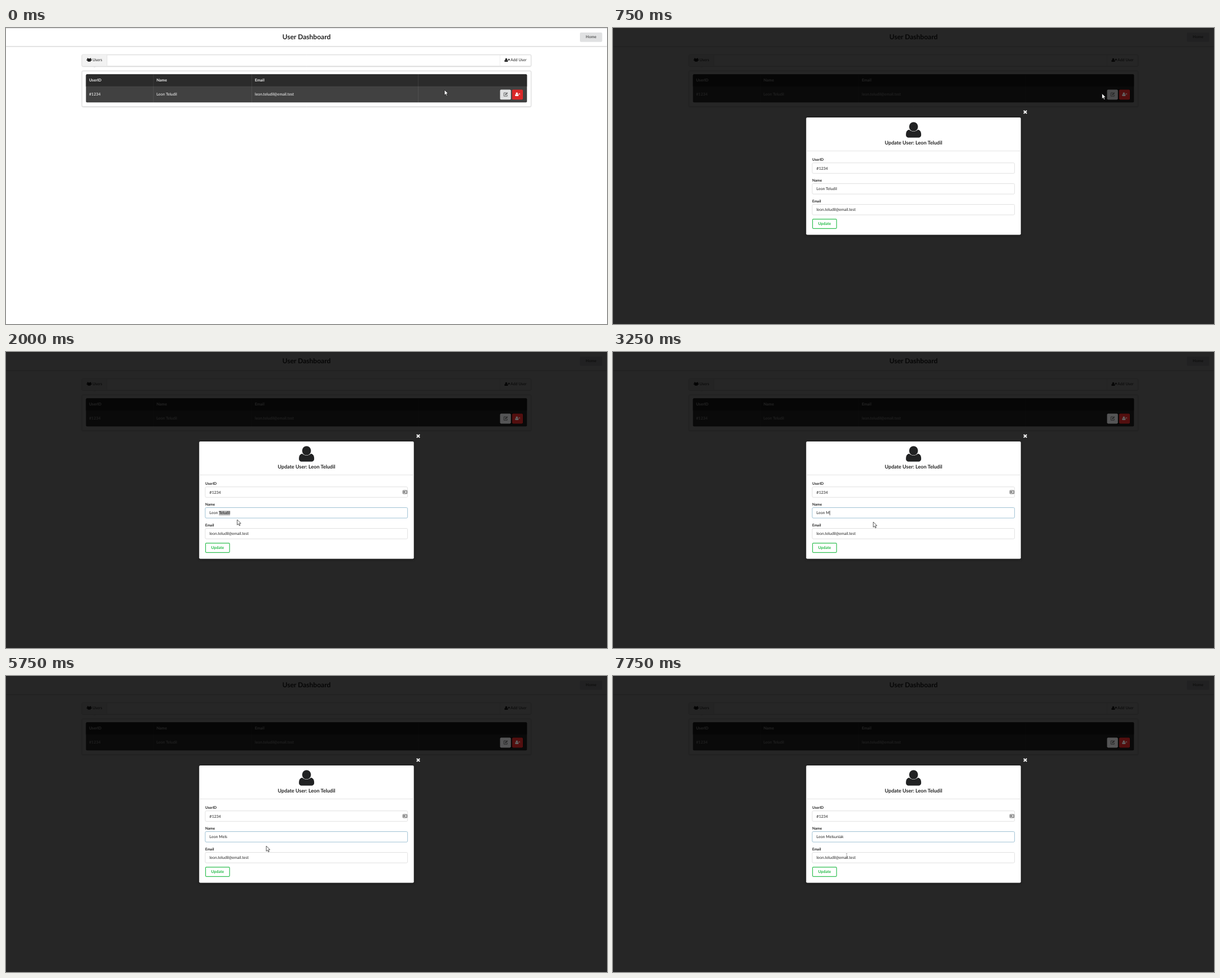
Write an HTML page with a canvas that moves like this. It is 1065x526 px and loops after 8 s.

```html
<!DOCTYPE html>
<html lang="en">
<head>
<meta charset="utf-8">
<title>User Dashboard</title>
<style>
html, body { margin: 0; width: 100%; height: 100%; overflow: hidden; background: #fff; }
canvas { display: block; width: 1065px; height: 526px; }
</style>
</head>
<body>
<canvas id="stage"></canvas>
<script>
const W = 1065, H = 526, LOOP = 8000, STEP = 250;
const canvas = document.getElementById('stage');
const ctx = canvas.getContext('2d');
const dpr = window.devicePixelRatio || 1;
canvas.width = W * dpr;
canvas.height = H * dpr;

const INK = 'rgba(0,0,0,.87)';
const LINE = '#dedede';
const USER = { id: '#1234', first: 'Leon ', last: 'Teludil', email: 'leon.teludil@email.test' };
const NEW_LAST = 'Melsuniak';
const fullName = USER.first + USER.last;

// [start time, pointer kind, x, y]
const POINTER = [
  [0, 'arrow', 777, 110], [250, 'arrow', 863, 110.5], [500, 'hand', 882, 116],
  [750, 'arrow', 866.5, 116.5], [1000, 'arrow', 463, 196], [1250, 'arrow', 369.5, 263],
  [1500, 'beam', 394, 280], [2000, 'arrow', 409.7, 298], [2250, 'arrow', 460.5, 302],
  [2500, 'arrow', 461.2, 302], [7750, 'beam', 414, 315]
];
// [start time, letters typed]
const TYPING = [[3250, 1], [3500, 2], [3750, 3], [4000, 4], [6000, 5], [6250, 6], [6500, 7], [6750, 9]];
// [start time, caret shown]
const CARET = [[0, 0], [3250, 1], [4500, 0], [5000, 1], [5750, 0], [6000, 1], [7500, 0]];

const latest = (list, t) => list.filter(e => e[0] <= t).pop();

function setFont(size, bold) {
  ctx.font = `${bold ? 700 : 400} ${size}px Lato, sans-serif`;
}

function text(str, x, y, { size = 7, bold = false, color = INK, align = 'left' } = {}) {
  setFont(size, bold);
  ctx.textAlign = align;
  ctx.fillStyle = color;
  ctx.fillText(str, x, y);
}

function rect(x, y, w, h, color) {
  ctx.fillStyle = color;
  ctx.fillRect(x, y, w, h);
}

function box(x, y, w, h, r, fill, stroke, lineWidth = 1) {
  ctx.beginPath();
  ctx.roundRect(x, y, w, h, r);
  if (fill) { ctx.fillStyle = fill; ctx.fill(); }
  if (stroke) { ctx.strokeStyle = stroke; ctx.lineWidth = lineWidth; ctx.stroke(); }
}

function shadowed(color, blur, dy, draw) {
  ctx.save();
  ctx.shadowColor = color;
  ctx.shadowBlur = blur * dpr;
  ctx.shadowOffsetY = dy * dpr;
  draw();
  ctx.restore();
}

function stroke(points, color, width) {
  ctx.beginPath();
  points.forEach(([x, y], i) => i ? ctx.lineTo(x, y) : ctx.moveTo(x, y));
  ctx.strokeStyle = color;
  ctx.lineWidth = width;
  ctx.stroke();
}

function cross(x, y, r, color, width) {
  stroke([[x - r, y - r], [x + r, y + r]], color, width);
  stroke([[x - r, y + r], [x + r, y - r]], color, width);
}

function shape(path, x, y, scale, fill, outline, width) {
  ctx.save();
  ctx.translate(x, y);
  ctx.scale(scale, scale);
  ctx.fillStyle = fill;
  ctx.fill(path);
  if (outline) {
    ctx.strokeStyle = outline;
    ctx.lineWidth = width;
    ctx.lineJoin = 'round';
    ctx.stroke(path);
  }
  ctx.restore();
}

const shoulders = new Path2D('M-13.5 22.5C-13.5 17-11.5 14.2-7.5 13.6C-3 17.8 3 17.8 7.5 13.6C11.5 14.2 13.5 17 13.5 22.5C13.5 26 11.5 27.5 8.5 27.5L-8.5 27.5C-11.5 27.5-13.5 26-13.5 22.5Z');
const head = new Path2D();
head.ellipse(0, 8.2, 7.8, 8.2, 0, 0, Math.PI * 2);
const arrow = new Path2D('M0 0L0 9.3L2.2 7.4L3.7 10.7L5.2 10L3.7 6.8L6.5 6.6Z');
const hand = new Path2D('M2.4 1.2C2.4-.1 4.2-.1 4.2 1.2L4.2 5L5.5 4.7L6.6 5.3L7.8 5.5L9 6.3L9 9.6L8 12L8 13.4L3 13.4L2.8 12L.3 8.4C-.2 7.2 1.1 6.7 2.4 8.2Z');

function person(x, y, scale, color) {
  shape(shoulders, x, y, scale, color);
  shape(head, x, y, scale, color);
}

function groupIcon() {
  person(144.9, 53.6, .16, INK);
  person(149.9, 53.6, .16, INK);
  person(147.4, 54, .21, INK);
}

function plusUserIcon() {
  person(886.4, 53.7, .23, INK);
  stroke([[889.4, 56.2], [893, 56.2]], INK, 1.1);
  stroke([[891.2, 54.4], [891.2, 58]], INK, 1.1);
}

function rowButtons(hover) {
  const gray = '#666768';
  box(875.5, 109.5, 19.2, 17.7, 2, hover ? '#c6c7c9' : '#e0e1e2');
  stroke([[886.3, 115.1], [882.3, 115.1], [882.3, 121.2], [888.2, 121.2], [888.2, 118.6]], gray, 1);
  stroke([[884.6, 119], [888.6, 115]], gray, 1.8);
  box(896.8, 109.5, 19.2, 17.7, 2, '#db2828');
  person(905.2, 114.6, .23, '#fff');
  cross(909.6, 117.3, 1.2, '#fff', 1);
}

function page(hover) {
  rect(0, 0, W, H, '#fff');
  shadowed('rgba(34,36,38,.22)', 2, 1, () => rect(0, 0, W, 32, '#fff'));
  rect(0, 0, W, 1, LINE);
  rect(0, 32, W, .6, '#d8d8d9');
  text('User Dashboard', 532.5, 20.2, { size: 12, bold: true, align: 'center' });
  box(1017, 8, 39.5, 16.8, 2, '#e0e1e2');
  text('Home', 1036.8, 18.4, { bold: true, color: 'rgba(0,0,0,.6)', align: 'center' });

  shadowed('rgba(34,36,38,.15)', 1.5, .7, () => {
    box(134.5, 47.2, 796, 20.6, 2, '#fff', LINE, .9);
    box(134.5, 76, 796, 63.6, 2, '#fff', LINE, .9);
  });
  box(134.9, 47.6, 44.1, 19.8, [2, 0, 0, 2], '#f2f2f2');
  rect(178.6, 47.6, .8, 19.8, LINE);
  rect(874.8, 47.6, .8, 19.8, '#e8e8e8');
  stroke([[154.8, 68], [156.9, 70], [159, 68]], '#d8d8d9', .7);
  groupIcon();
  text('Users', 153.2, 59.3);
  plusUserIcon();
  text('Add User', 894, 59.3);

  box(141.7, 82.2, 781.5, 50, 2, '#414141');
  box(141.7, 82.2, 781.5, 21.8, [2, 2, 0, 0], '#2b2b2b');
  for (const x of [260.7, 435, 730.2]) rect(x, 82.2, .8, 50, 'rgba(255,255,255,.1)');
  rect(141.7, 103.7, 781.5, .6, 'rgba(255,255,255,.08)');
  const columns = [[147.3, 'UserID', USER.id], [266.7, 'Name', fullName], [441, 'Email', USER.email]];
  for (const [x, title, value] of columns) {
    text(title, x, 95.4, { bold: true, color: 'rgba(255,255,255,.93)' });
    text(value, x, 120.4, { color: '#fff' });
  }
  rowButtons(hover);
}

function cardIcon() {
  box(703.3, 246, 7.4, 5.8, .7, '#fff', '#555', .9);
  rect(704.5, 247.4, 2.3, 2.9, '#555');
  for (const y of [247.3, 248.7, 250.1]) rect(707.5, y, 2.2, .7, '#666');
}

function field(label, value, y, focused) {
  text(label, 353, y - 3, { size: 6.5, bold: true });
  box(353, y + .3, 358.6, 18.6, 2, '#fff', focused ? '#96bbd0' : LINE, .9);
  text(value, 360.6, y + 12.1);
}

function nameField(t) {
  const typed = latest(TYPING, t);
  const last = typed ? NEW_LAST.slice(0, typed[1]) : USER.last;
  const focused = t >= 1750;
  field('Name', USER.first + last, 276.2, focused);
  if (!focused) return;
  setFont(7);
  const start = 360.6 + ctx.measureText(USER.first).width;
  const width = ctx.measureText(last).width;
  if (!typed) {
    rect(start, 282, width, 8.4, '#b5b5b5');
    text(last, start, 288.3);
  } else if (latest(CARET, t)[1]) {
    rect(start + width, 282, .7, 8.2, '#222');
  }
}

function modal(t) {
  shadowed('rgba(0,0,0,.3)', 5, 1.5, () => box(342.3, 159, 380.4, 208.5, 2, '#fff'));
  cross(730.5, 149.4, 2.7, '#f0f0f0', 2.1);
  person(532.6, 167.2, 1, '#212223');
  text('Update User: ' + fullName, 532.5, 206.7, { size: 8.98, bold: true, align: 'center' });
  rect(342.3, 218, 380.4, .8, LINE);
  field('UserID', USER.id, 239.4);
  if (t >= 1750) cardIcon();
  nameField(t);
  field('Email', USER.email, 313.2);
  box(353.6, 339.7, 42.6, 16.6, 1.5, '#fff', '#30bf52', 1.2);
  text('Update', 374.9, 350.4, { bold: true, color: '#21ba45', align: 'center' });
}

function pointer([, kind, x, y]) {
  if (kind === 'arrow') shape(arrow, x, y, 1, '#fff', '#111', .7);
  else if (kind === 'hand') shape(hand, x, y, 1, '#fff', '#111', .8);
  else {
    const color = 'rgba(0,0,0,.45)';
    rect(x - .3, y, .6, 9, color);
    rect(x - 1.3, y, 2.6, .5, color);
    rect(x - 1.3, y + 8.5, 2.6, .5, color);
  }
}

function draw(t) {
  ctx.setTransform(dpr, 0, 0, dpr, 0, 0);
  ctx.textRendering = 'geometricPrecision';
  page(t === 500);
  if (t >= 750) {
    rect(0, 0, W, H, 'rgba(0,0,0,.85)');
    // The row buttons stay brighter than the rest of the dimmed page.
    rowButtons(t === 750);
    box(875, 109, 41.5, 18.7, 2, 'rgba(0,0,0,.62)');
    modal(t);
  }
  pointer(latest(POINTER, t));
}

const began = performance.now();
function frame() {
  const t = (performance.now() - began) % LOOP;
  draw(Math.floor(t / STEP) * STEP);
  requestAnimationFrame(frame);
}
frame();
</script>
</body>
</html>
```
